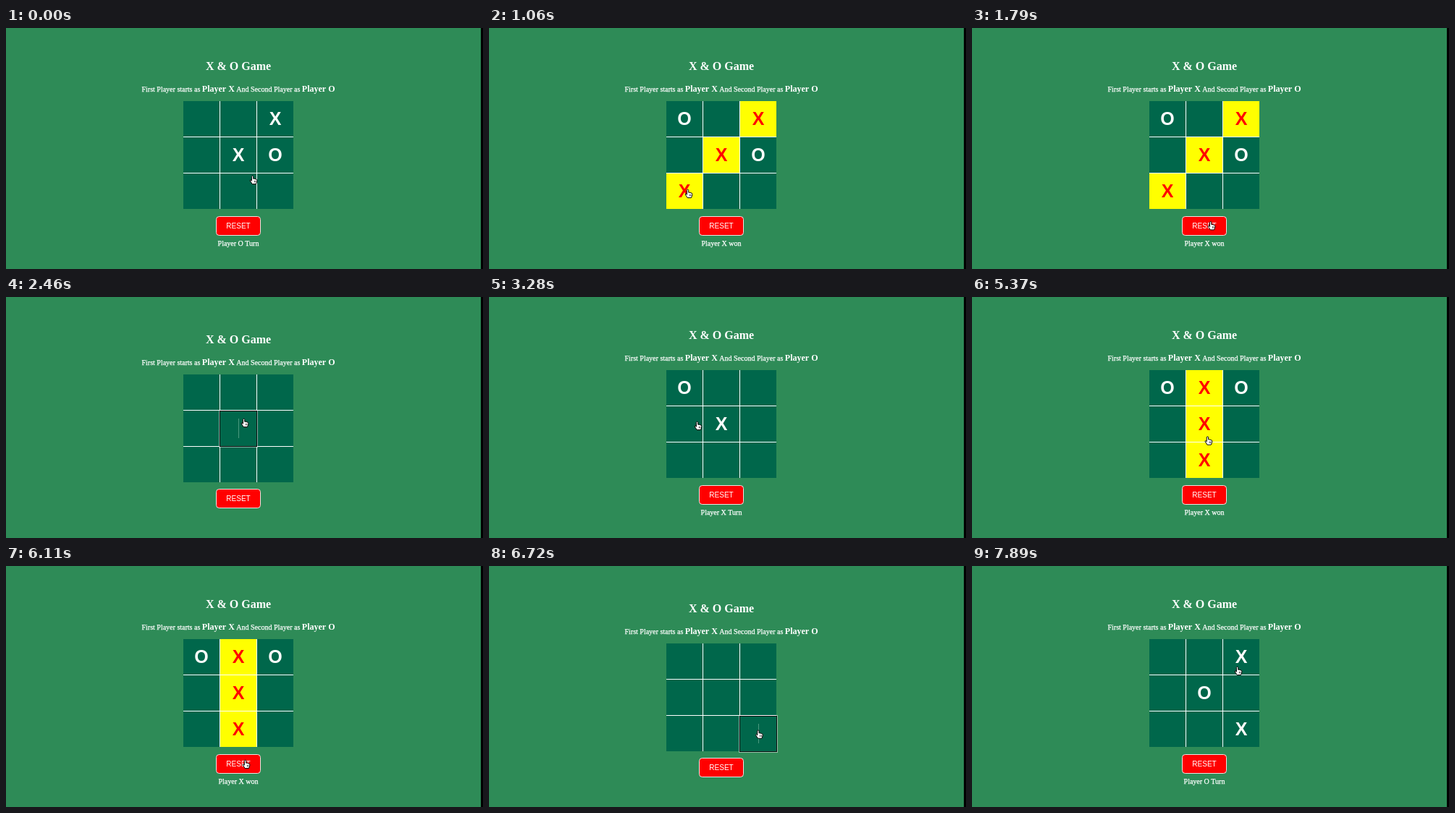
Animation of 659x333 px, one loop 8 s. Source, as an HTML page with a canvas:

```html
<!DOCTYPE html>
<html lang="en">
<head>
<meta charset="utf-8">
<title>X &amp; O Game</title>
<style>
  html, body { margin: 0; width: 100%; height: 100%; overflow: hidden; background: #2e8b57; }
  canvas { display: block; }
</style>
</head>
<body>
<canvas id="stage" width="659" height="333"></canvas>
<script>
const ctx = document.getElementById('stage').getContext('2d');
const LOOP = 8000;
const FOCUS_MS = 130;
const SERIF = '"Liberation Serif", serif';
const SANS = '"Liberation Sans", sans-serif';
const LINES = ['012', '345', '678', '036', '147', '258', '048', '246'];

// moves lists the clicked cells in order, one every step ms
const GAMES = [
  { start: -800, step: 400, moves: '45206', reset: 1850 },
  { start: 2530, step: 590, moves: '40721', reset: 6300 },
  { start: 6810, step: 490, moves: '842', reset: Infinity }
];

const cellX = i => 245 + 51 * (i % 3);
const cellY = i => 101 + 50 * Math.floor(i / 3);
const moveTime = (game, i) => game.start + game.step * i;

// key poses of the pointer; every other click adds a stop of its own
const path = [
  { t: 0, x: 341, y: 210 },
  { t: 1060, x: 275, y: 229 },
  { t: 2460, x: 329, y: 174 },
  { t: 3280, x: 288, y: 178 },
  { t: 4760, x: 322, y: 142 },
  { t: 6110, x: 331, y: 274 },
  { t: 7890, x: 367, y: 145 }
];

function addStop(t, x, y) {
  if (t > 0 && t < LOOP && path.every(p => Math.abs(p.t - t) > 140)) path.push({ t, x, y });
}

for (const game of GAMES) {
  [...game.moves].forEach((cell, i) => addStop(moveTime(game, i), cellX(cell) + 29, cellY(cell) + 28));
  addStop(game.reset, 331, 274);
}
path.sort((a, b) => a.t - b.t);

function pointerAt(t) {
  const i = path.findIndex(p => p.t > t);
  if (i < 0) return path[path.length - 1];
  const a = path[i - 1], b = path[i];
  const k = (t - a.t) / (b.t - a.t);
  const e = k * k * (3 - 2 * k);
  return { x: a.x + (b.x - a.x) * e, y: a.y + (b.y - a.y) * e };
}

function gameAt(t) {
  const game = GAMES.find(g => t < g.reset);
  const { moves } = game;
  const cells = [];
  let count = 0;
  while (count < moves.length && moveTime(game, count) <= t) {
    cells[moves[count]] = 'XO'[count % 2];
    count++;
  }
  const focused = count < moves.length && moveTime(game, count) - t <= FOCUS_MS;
  const win = LINES.find(([a, b, c]) => cells[a] && cells[a] === cells[b] && cells[a] === cells[c]);
  let status = '';
  if (win) status = `Player ${cells[win[0]]} won`;
  else if (count) status = `Player ${'XO'[count % 2]} Turn`;
  return { cells, focus: focused ? +moves[count] : -1, win: win || '', status };
}

function text(str, x, y, font, color = '#fff', align = 'center') {
  ctx.font = font;
  ctx.fillStyle = color;
  ctx.textAlign = align;
  ctx.fillText(str, x, y);
}

// small serif text gets a hairline to look as heavy as screen text
function smallText(str, x, y, align) {
  text(str, x, y, `10px ${SERIF}`, '#fff', align);
  ctx.lineWidth = 0.25;
  ctx.strokeStyle = '#fff';
  ctx.strokeText(str, x, y);
}

function rect(x, y, w, h, color) {
  ctx.fillStyle = color;
  ctx.fillRect(x, y, w, h);
}

function frame(x, y, w, h, color) {
  ctx.lineWidth = 1;
  ctx.strokeStyle = color;
  ctx.strokeRect(x + 0.5, y + 0.5, w - 1, h - 1);
}

function drawIntro() {
  text('X & O Game', 321, 58, `bold 16px ${SERIF}`);
  let x = 187.5;
  const parts = ['First Player starts as ', 'Player X', ' And Second Player as ', 'Player O'];
  parts.forEach((part, i) => {
    if (i % 2) text(part, x, 88, `bold 12px ${SERIF}`, '#fff', 'left');
    else smallText(part, x, 88, 'left');
    x += ctx.measureText(part).width;
  });
}

function drawBoard({ cells, focus, win }) {
  rect(245, 101, 152, 149, '#fff');
  for (let i = 0; i < 9; i++) {
    const x = cellX(i), y = cellY(i), won = win.includes(i);
    rect(x, y, 50, 49, won ? '#ff0' : '#00674b');
    if (cells[i]) text(cells[i], x + 25, y + 33, `bold 25px ${SANS}`, won ? '#f00' : '#fff');
  }
  if (focus >= 0) {
    const x = cellX(focus), y = cellY(focus);
    frame(x - 2, y - 1, 54, 52, 'rgba(255, 255, 255, 0.5)');
    frame(x - 1, y, 52, 50, '#101010');
    rect(x + 25, y + 11, 1, 27, '#4b9a80');
  }
}

function drawButton(y) {
  ctx.beginPath();
  ctx.roundRect(290.5, y + 0.5, 61, 26, 4);
  ctx.fillStyle = '#f00';
  ctx.fill();
  ctx.lineWidth = 1;
  ctx.strokeStyle = 'rgba(255, 255, 255, 0.85)';
  ctx.stroke();
  text('RESET', 321, y + 17, `10px ${SANS}`);
}

const HAND = new Path2D(`M-1.6 1.2V-4.6Q-1.4-5.8-.4-5.8T.7-4.6V-1.8L2.4-1.7 4-1.2
  5.4-.6Q6 0 5.8 1.4L5.4 3.2 4.4 5.6H-.8L-2.2 3.4-3.8 1Q-3.9-.2-2.8 0Z`);

function drawHand({ x, y }) {
  ctx.save();
  ctx.translate(x, y);
  ctx.fillStyle = '#fff';
  ctx.strokeStyle = '#000';
  ctx.lineWidth = 1;
  ctx.fill(HAND);
  ctx.stroke(HAND);
  rect(1.9, 0.8, 0.7, 2.6, '#000');
  rect(3.6, 0.8, 0.7, 2.6, '#000');
  ctx.restore();
}

function draw(now) {
  const t = now % LOOP;
  const game = gameAt(t);
  rect(0, 0, 659, 333, '#2e8b57');
  rect(656, 0, 3, 333, '#000');
  ctx.save();
  // the column is centred, so it sits lower without a status line
  if (!game.status) ctx.translate(0, 6);
  drawIntro();
  drawBoard(game);
  ctx.restore();
  drawButton(game.status ? 260 : 265);
  smallText(game.status, 321, 301, 'center');
  drawHand(pointerAt(t));
}

const start = performance.now();
function tick() {
  draw(performance.now() - start);
  requestAnimationFrame(tick);
}
tick();
</script>
</body>
</html>
```
